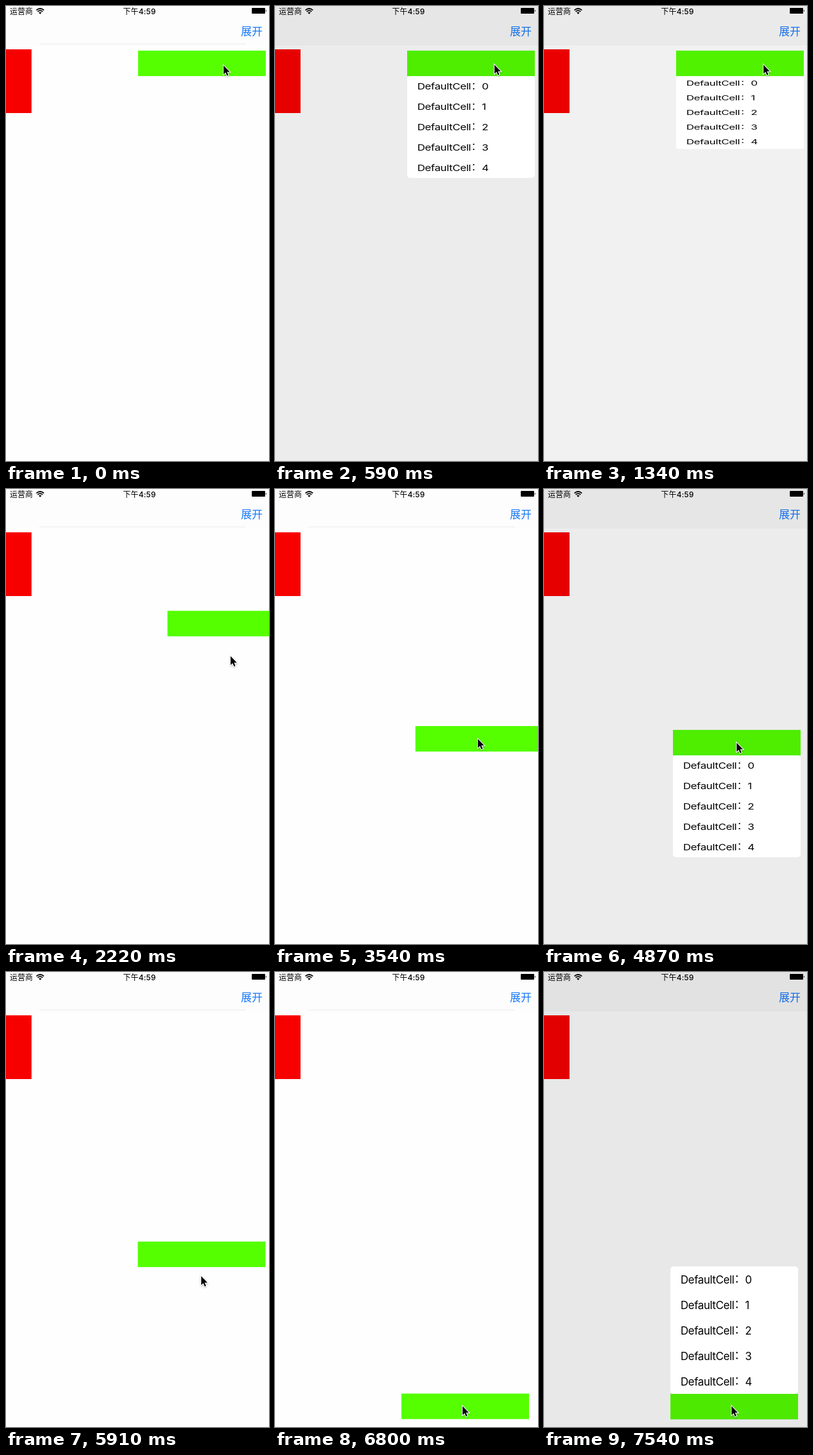
These frames come from a looping animation (412x714 px, 7990 ms). An HTML page:

```html
<!DOCTYPE html>
<html lang="zh-CN">
<head>
<meta charset="utf-8">
<style>
html, body { margin: 0; width: 100%; height: 100%; overflow: hidden; background: #fefefe; }
svg { display: block; width: 412px; height: 714px; }
text { font-family: Inter, "Noto Sans CJK SC", "Noto Sans CJK", sans-serif; }
.cell { font-size: 17px; letter-spacing: -.4px; }
.wide { font-family: "Noto Sans CJK SC", "Noto Sans CJK", sans-serif; font-size: 17px; }
</style>
</head>
<body>
<svg viewBox="0 0 412 714">
  <defs>
    <filter id="soft" x="-50%" y="-50%" width="220%" height="220%">
      <feDropShadow dx="0" dy="1" stdDeviation="1" flood-opacity=".35"/>
    </filter>
  </defs>
  <rect width="412" height="714" fill="#fefefe"/>
  <rect id="nav" width="412" height="62"/>
  <rect id="hair" x="52" y="58" width="323" height="3" fill="#f6f6f6"/>
  <rect y="68" width="40" height="100" fill="#f70000"/>
  <text x="368" y="46" font-size="17" fill="#1677f8">展开</text>
  <rect id="bar" width="200" height="40" fill="#55ff00"/>
  <rect id="dim" width="412" height="714"/>
  <g id="status">
    <text x="6" y="13" font-size="12">运营商</text>
    <text x="209" y="13" font-size="12" font-weight="500" text-anchor="middle" letter-spacing=".2">下午4:59</text>
    <g fill="none" stroke="#000" stroke-width="1.7">
      <path d="M47.6 6.6Q53.5 1.4 59.4 6.6"/>
      <path d="M49.6 8.9Q53.5 5.5 57.4 8.9"/>
    </g>
    <path d="M51.3 10.4Q53.5 8.7 55.7 10.4L53.5 12.7Z"/>
    <rect x="385" y="3" width="21" height="9" rx="1"/>
    <path d="M407 6Q409 7.5 407 9Z"/>
  </g>
  <g id="list"><rect width="200" height="200" rx="5" fill="#fff"/></g>
  <path id="arrow" d="M.8 1.2V15.2L4 12.3 6.3 17.4 8.4 16.5 6.2 11.4H10.6Z"
    stroke="#fff" stroke-width="2" paint-order="stroke" filter="url(#soft)"/>
</svg>
<script>
const LOOP = 7990, COUNT = 54, STEP = 147.9, LEAD = 12; // the picture refreshes once per STEP
const ROWS = 5, ROW = 40, HEIGHT = ROWS * ROW, DIM = 0.088;
const LAG = 0.28, RATE = 0.356;
const $ = id => document.getElementById(id);
const clamp = (v, lo, hi) => Math.min(hi, Math.max(lo, v));
const smooth = v => { const u = clamp(v, 0, 1); return u * u * (3 - 2 * u); };

// Pointer moves: start, end (in steps), x, y, ease-out power
const moves = [
  [0, 1, 343, 91, 1],
  [9, 12, 304, 89, 1],
  [12, 14, 349, 165, .5],
  [14, 15, 351, 261, .5],
  [15, 24, 317, 391, 6],
  [24, 28, 299, 397, 2],
  [31, 32, 301, 397, 1],
  [35, 39, 297, 396, 1],
  [39, 40, 305, 476, .65],
  [40, 46, 293, 680, 2]
];
const drags = [
  { start: 12, end: 28, gx: 97, gy: 19 },
  { start: 39, end: 46, gx: 95, gy: 18 }
];
const menus = [[2, 7.73], [31, 34.73], [48, Infinity]]; // opens, closes

function pointer(k) {
  let x = 340, y = 92;
  for (const [start, end, toX, toY, power] of moves) {
    if (k <= start) break;
    const u = 1 - (1 - clamp((k - start) / (end - start), 0, 1)) ** power;
    x += (toX - x) * u;
    y += (toY - y) * u;
  }
  return [x, y];
}

// The bar trails the pointer while it is held, then rests
function barAt(k) {
  const { start, end, gx, gy } = k > drags[1].start ? drags[1] : drags[0];
  const [x, y] = pointer(clamp(k - LAG, start, end));
  return [x - gx, y - gy];
}

const openAt = k => menus.reduce((sum, [on, off]) =>
  sum + smooth((k - on) * RATE) - smooth((k - off) * RATE), 0);

function addText(str, x, y, cls) {
  const el = document.createElementNS("http://www.w3.org/2000/svg", "text");
  el.setAttribute("x", x);
  el.setAttribute("y", y);
  el.setAttribute("class", cls);
  el.textContent = str;
  $("list").append(el);
}

for (let i = 0; i < ROWS; i++) {
  const y = i * ROW + 26.5;
  addText("DefaultCell", 16, y, "cell");
  addText("：", 100, y - 2, "wide");
  addText(i, 117, y, "cell");
}

const place = (id, x, y, extra = "") =>
  $(id).setAttribute("transform", `translate(${x} ${y})${extra}`);

function draw(ms) {
  const k = Math.min(COUNT - 1, Math.floor((ms + LEAD) / STEP));
  const [x, y] = barAt(k);
  const open = openAt(k), shown = open > 0.001;
  const up = y + ROW + HEIGHT > 714;

  place("bar", x, y);
  place("arrow", ...pointer(k));
  place("list", x, up ? y - HEIGHT * open : y + ROW, ` scale(1 ${open})`);
  $("list").style.display = shown ? "" : "none";
  $("dim").setAttribute("fill-opacity", DIM * open);
  $("nav").setAttribute("fill", shown ? "#f7f7f7" : "#fdfdfd");
  $("hair").style.display = shown ? "none" : "";
}

const start = performance.now();
function tick() {
  draw((performance.now() - start) % LOOP);
  requestAnimationFrame(tick);
}
tick();
</script>
</body>
</html>
```
